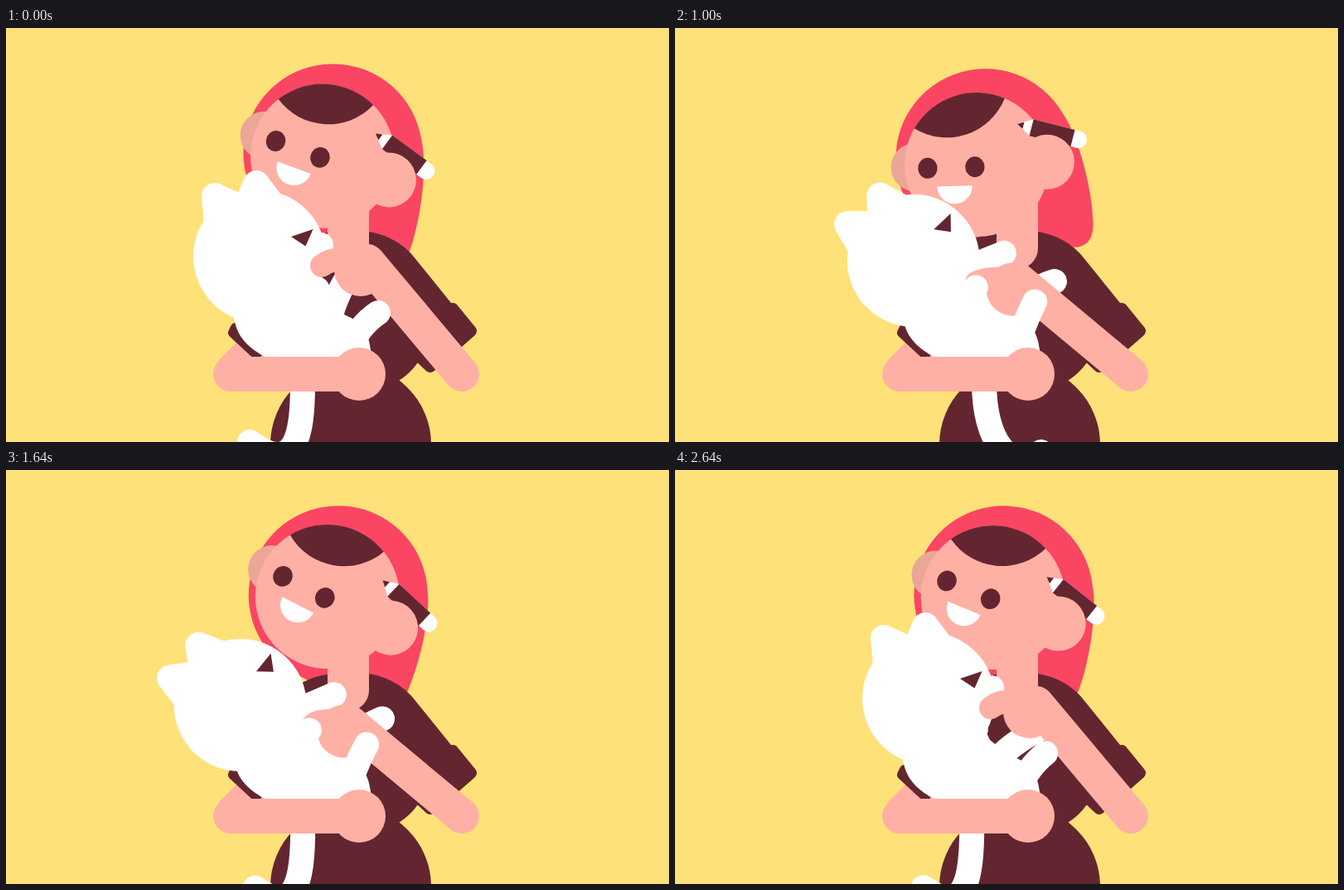
Animation, 800 px wide and 500 px high, one loop 2680 ms. Source, as an HTML page:

```html
<!DOCTYPE html>
<html lang="en">
<head>
<meta charset="utf-8">
<title>Cuddling a cat</title>
<style>
  html, body { margin: 0; width: 100%; height: 100%; overflow: hidden; background: #fee179; }
  svg { display: block; width: 100%; height: 100%; }
  .red { fill: #fa4563; }
  .skin { fill: #ffb0a4; }
  .dark { fill: #632630; }
  .white { fill: #fff; }
  .round { stroke-linejoin: round; }
  .limb { fill: none; stroke: #fff; stroke-width: 30; stroke-linecap: round; }
  .arm { fill: none; stroke: #ffb0a4; stroke-width: 42; stroke-linecap: round; }
  .dark.round { stroke: #632630; }
  .white.round { stroke: #fff; stroke-width: 32; }
</style>
</head>
<body>
<svg viewBox="0 0 800 500">
  <rect width="800" height="500" fill="#fee179"/>

  <g id="hood">
    <path class="red" d="M11 100.5A108 108 0 1 1 105 -60C122 -35 139 30 138.5 75C138 95 130 101 118 103Z"/>
    <circle cx="-74.5" cy="1" r="29" fill="#eba698"/>
  </g>

  <g id="dress">
    <path class="skin" d="M256 402L284 374L320 400L290 425Z"/>
    <path class="dark" d="M388 247Q413 242 438 246C462 250 480 262 491 275L537 332L540 380L497 404Q488 417 474 426L420 470L330 400L276 366L285 340L336 275C346 262 364 250 388 247Z"/>
    <path class="dark round" stroke-width="12" d="M277 362L274 368L302 394L330 360Z"/>
    <path class="dark round" stroke-width="14" d="M539 339L561 366L512 409L498 396Z"/>
    <circle class="dark" cx="416" cy="503" r="97"/>
  </g>

  <path id="tail" class="limb"/>

  <rect class="skin" x="388" y="170" width="50" height="121" rx="25"/>
  <g id="head">
    <circle class="skin" r="87"/>
    <path class="dark" d="M-74 -46A87 87 0 0 1 36 -79.2A75 75 0 0 1 -74 -46Z"/>
    <ellipse class="dark" cx="-59.2" cy="2.6" rx="11.6" ry="12.5"/>
    <ellipse class="dark" cx="-2.2" cy="2.6" rx="11.6" ry="12.5"/>
    <rect class="skin lid" x="-72" y="-12" width="26"/>
    <rect class="skin lid" x="-15" y="-12" width="26"/>
    <path class="white" d="M-48.5 25H-6A21.25 21.5 0 0 1 -48.5 25Z"/>
    <g transform="translate(67.3 -43) rotate(16)">
      <path class="white" d="M-11 -3.9L0 -10.3H58.5A10.3 10.3 0 0 1 58.5 10.3H0L-11 3.9Z"/>
      <path class="dark" d="M-17.5 0L-10 -4.2V4.2ZM0 -10.4H51.5V10.4H0Z"/>
    </g>
    <circle class="skin" cx="85" cy="-1" r="33"/>
  </g>

  <path id="backLeg" class="limb"/>
  <path class="white" d="M275 350C279 376 296 388 314 398L315 402H440V389C438 370 430 355 412 348C400 342 391 335 380 326C372 308 365 292 330 270Z"/>
  <path id="paw" class="limb"/>
  <g id="cat">
    <circle class="white" cx="306" cy="276" r="80"/>
    <path class="white round" d="M252 203L256 245L280 216ZM302 188L295 205L317 208Z"/>
    <path class="dark" d="M344 252L370.5 243L361.5 263.5Z"/>
  </g>

  <g id="forearm">
    <path class="arm" d="M550 418L436 282"/>
    <circle class="skin" cx="428" cy="292" r="32"/>
  </g>
  <path id="thumb" class="arm" style="stroke-width:28"/>
  <path id="lowPaw" class="limb"/>
  <path id="frontLeg" class="limb"/>

  <path class="arm" d="M271 418H420"/>
  <circle class="skin" cx="426" cy="418" r="32"/>
</svg>

<script>
const LOOP = 2680, STEP = 40, KICK = 680;
const $ = id => document.getElementById(id);
const lids = document.querySelectorAll('.lid');

const lerp = (a, b, k) => a + (b - a) * k;
const smooth = u => u * u * (3 - 2 * u);
const draw = (id, d) => $(id).setAttribute('d', d);
const move = (id, v) => $(id).setAttribute('transform', v);

// point at a distance and angle from the hip of the back leg
function fromHip(r, deg) {
  const a = deg * Math.PI / 180;
  return `${392 + r * Math.cos(a)} ${346 + r * Math.sin(a)}`;
}

// eased from key to key, resting at each one
function ease(keys, t) {
  const i = keys.findIndex(k => k[0] > t);
  if (i < 0) return keys[keys.length - 1][1];
  if (i === 0) return keys[0][1];
  const [a, b] = [keys[i - 1], keys[i]];
  return lerp(a[1], b[1], smooth((t - a[0]) / (b[0] - a[0])));
}

// flowing curve through the keys
function flow(keys, t) {
  const slope = i => {
    const a = keys[Math.max(i - 1, 0)], b = keys[Math.min(i + 1, keys.length - 1)];
    return (b[1] - a[1]) / (b[0] - a[0]);
  };
  let i = 0;
  while (i < keys.length - 2 && keys[i + 1][0] <= t) i++;
  const [t0, v0] = keys[i], [t1, v1] = keys[i + 1];
  const d = t1 - t0, u = (t - t0) / d, w = 1 - u;
  return v0 * (1 + 2 * u) * w * w + v1 * u * u * (3 - 2 * u)
    + d * u * w * (slope(i) * w - slope(i + 1) * u);
}

const HEAD = [[-215, 27], [495, -3], [905, -3], [1625, 27], [2465, 27], [3175, -3]];
const CAT = [[0, 0], [590, -42], [1220, -18], [1660, -32.5], [2300, 0]];
const ARM = [[0, 0], [270, 1], [1680, 1], [2000, 0]];
const CURL = [[850, 0], [1150, 14], [1680, 14], [2000, 0]];
const LID = [[240, 0], [380, 22], [500, 0]];
const TAIL = [[-40, -.93], [0, -1], [280, .2], [760, 1], [1200, .4], [1640, -.92],
  [2040, -.45], [2300, 0], [2640, -.93], [2680, -1]];

function render(t) {
  const turn = ease(HEAD, t);
  const pose = `translate(399.7 206) rotate(${turn + 3}) translate(-36.7 -40) rotate(-3)`;
  move('hood', pose);
  move('head', pose);
  const lid = ease(LID, t);
  lids.forEach(el => el.setAttribute('height', lid ? lid + 2 : 0));

  move('cat', `rotate(${ease(CAT, t)} 308 320)`);

  // opposite limbs kick out of step
  const q = .5 - .5 * Math.cos(2 * Math.PI * t / KICK);
  const c = Math.cos(2 * Math.PI * (t - 460) / KICK);
  const jolt = Math.max(0, 1 - t / 120);
  draw('paw', `M352 290L${380 + 17 * q} ${262 + 10 * q}`);
  draw('frontLeg', `M412 392Q${425 - 7 * q} ${360 + 2 * q} ${449 - 15 * q} ${344 - 13.5 * q}`);
  draw('lowPaw', `M350 335L${365 - 8 * c + 7 * jolt} ${314 - 3 * c}`);
  const kick = -35 + 14 * c - 20 * jolt;
  draw('backLeg', `M392 346Q${fromHip(42, kick - 12)} ${fromHip(77, kick)}`);

  const k = ease(ARM, t), curl = ease(CURL, t);
  move('forearm', `rotate(${-10.2 * k} 550 418)`);
  draw('thumb', `M${lerp(410, 395, k)} ${lerp(281, 303, k)}`
    + `Q${lerp(394, 372, k) + curl / 2} ${lerp(277, 302, k)} ${lerp(381, 357, k) + curl} ${lerp(287, 307.5, k)}`);

  const s = flow(TAIL, t), x = 364 + 9 * s + 3 * s * s;
  draw('tail', `M${x} 420V430C${x} 495 ${378 + 30 * s} 540 ${376 + 82 * s} ${500 + 60 * Math.max(0, 1 - Math.abs(s))}`);
}

function tick() {
  const t = performance.now() % LOOP;
  render(Math.floor(t / STEP) * STEP);
  requestAnimationFrame(tick);
}
tick();
</script>
</body>
</html>
```
